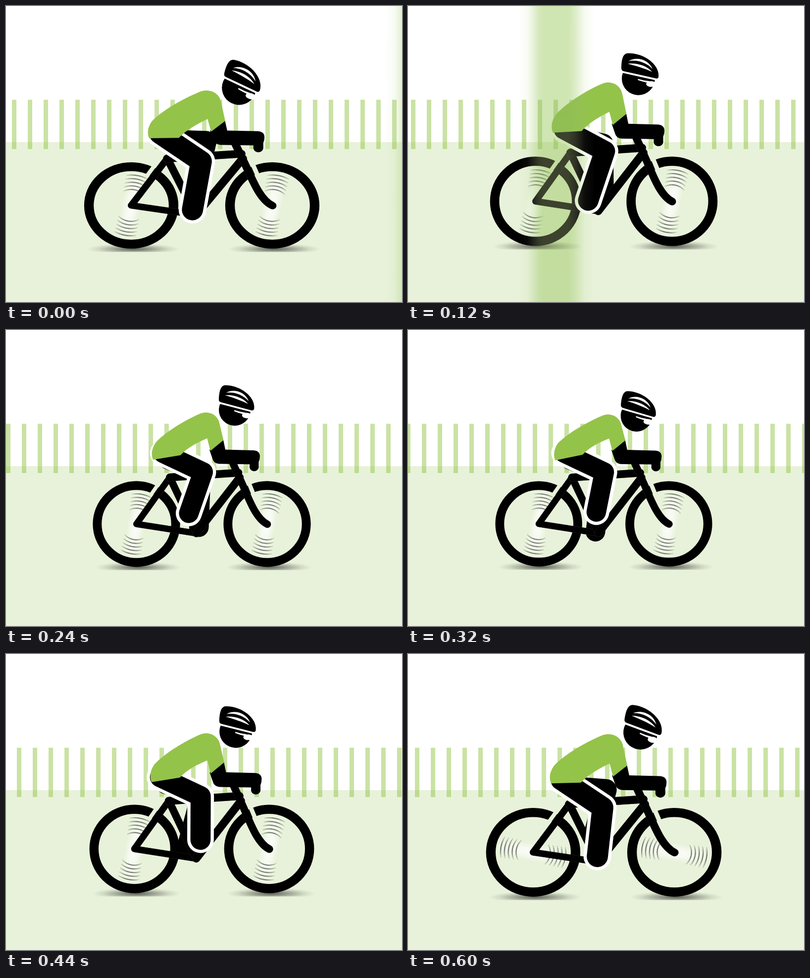
Write an HTML page with a canvas that moves like this. It is 800 by 600 pixels and loops after 640 ms.

```html
<!DOCTYPE html>
<html lang="en">
<head>
<meta charset="utf-8">
<title>Cyclist</title>
<style>
html, body { margin: 0; width: 100%; height: 100%; overflow: hidden; background: #fff; }
canvas { display: block; width: 800px; height: 600px; }
</style>
</head>
<body>
<canvas id="stage" width="800" height="600"></canvas>
<script>
const ctx = document.getElementById('stage').getContext('2d');
const LOOP = 640, STEP = 40, MID = 395.5, FLOOR = 489;
const GREEN = '#94c34a', GROUND = '#e8f2da';
const HUBS = [[255.5, 397], [535.5, 397]];

const rad = degrees => degrees * Math.PI / 180;
// Smooth waves over one turn of the pedals, in degrees
const wave = (angle, peak) => Math.cos(rad(angle - peak));
const hump = (angle, peak, sharpness) => Math.abs(Math.cos(rad(angle - peak) / 2)) ** sharpness;

const foot = angle => [378.5 - 15 * Math.sin(rad(angle + 7)), 369 + 44 * hump(angle, 0, 3)];

function pose(t) {
  const a = t / LOOP * 360;
  const land = hump(a, 0, 24), sag = hump(a, 185, 5);
  const sx = .978 + .041 * wave(a, -14);
  const hip = [313 + 4 * wave(a, 130), 249.5 + 8.5 * land];
  const farFoot = foot(a + 180);
  return {
    sx,
    sy: sx * (1.002 - .067 * land),
    base: FLOOR + (sx - 1) * 155,
    shoulder: 9 * sag,
    back: -1 - 3 * wave(a, 0),
    hem: 2 + 2.8 * wave(a, 20),
    head: [MID + 74.5 * sx + 5 * land, 134 + 24 * hump(a, 5, 13) + 32 * sag],
    tilt: rad(13 * land + 4 * sag),
    near: [hip, [395.5 + 3 * wave(a, 110), 288 + 27 * hump(a, 0, 8)], foot(a)],
    far: [
      [hip[0] + 12, hip[1] + 14],
      [394 + 10 * land, 282.5 - 8 * wave(a, 0)],
      [farFoot[0] + 2, farFoot[1] - 4]
    ]
  };
}

function fill(path, color) {
  ctx.fillStyle = color;
  ctx.fill(new Path2D(path));
}

function stroke(path, color, width) {
  ctx.strokeStyle = color;
  ctx.lineWidth = width;
  ctx.stroke(new Path2D(path));
}

function scenery(t) {
  ctx.fillStyle = '#fff';
  ctx.fillRect(0, 0, 800, 600);
  ctx.fillStyle = GROUND;
  ctx.fillRect(0, 276, 800, 324);
  ctx.fillStyle = 'rgba(149,197,75,.5)';
  for (let x = 12 - t / 20 - 32; x < 800; x += 32) ctx.fillRect(x, 190, 9, 100);
}

function glow(x, y, rx, ry, stops) {
  ctx.save();
  ctx.translate(x, y);
  ctx.scale(rx, ry);
  const g = ctx.createRadialGradient(0, 0, 0, 0, 0, 1);
  stops.forEach(([at, color]) => g.addColorStop(at, color));
  ctx.fillStyle = g;
  ctx.fillRect(-1, -1, 2, 2);
  ctx.restore();
}

function shadow(x) {
  ctx.save();
  ctx.beginPath();
  ctx.rect(x - 100, FLOOR - 20, 200, 27);
  ctx.clip();
  glow(x + 4, FLOOR + 1, 92, 12, [
    [0, 'rgba(0,0,0,.6)'], [.4, 'rgba(0,0,0,.33)'], [.75, 'rgba(0,0,0,.1)'], [1, 'rgba(0,0,0,0)']
  ]);
  ctx.restore();
}

function spokes(x, y, angle) {
  ctx.save();
  ctx.translate(x, y);
  ctx.rotate(angle);
  glow(0, 0, 76, 19, [
    [0, 'rgba(255,255,255,.9)'], [.5, 'rgba(255,255,255,.55)'], [1, 'rgba(255,255,255,0)']
  ]);
  ctx.lineCap = 'butt';
  const arc = (r, side, span, color) => {
    ctx.beginPath();
    ctx.arc(0, 0, r, side - span, side + span);
    ctx.lineWidth = 2.2;
    ctx.strokeStyle = color;
    ctx.stroke();
  };
  for (const side of [0, Math.PI]) {
    for (let r = 34; r < 66; r += 7.7) {
      for (let half = 22; half > 5; half -= 5) {
        arc(r, side, half / r, 'rgba(40,45,35,.2)');
        arc(r + 3, side, half / r, 'rgba(255,255,255,.14)');
      }
    }
  }
  ctx.restore();
}

function wheels(t) {
  const angle = rad(t < 460 ? -79 : 10);
  for (const [x, y] of HUBS) {
    shadow(x);
    spokes(x, y, angle);
    ctx.beginPath();
    ctx.ellipse(x, y, 84, 82.5, 0, 0, 7);
    ctx.lineWidth = 19;
    ctx.strokeStyle = '#000';
    ctx.stroke();
  }
  // Slits beside the stay and the fork
  ctx.lineCap = 'butt';
  stroke('M284.5 337 L304 309', GROUND, 8);
  stroke('M494 303 L508 337', GROUND, 9);
}

function frame() {
  ctx.lineCap = ctx.lineJoin = 'round';
  const tubes = [
    ['M384 417 L255.5 397 L327 297', 13],
    ['M327 297 L384 417', 15],
    ['M327 297 L474 287', 16],
    ['M477 297 L384 417', 16],
    ['M462 266 L484 315 C497 345 512 386 536 397.5', 15]
  ];
  for (const [path, width] of tubes) {
    stroke(path, '#2b2b2b', width + .8);
    stroke(path, '#000', width);
  }
}

function leg(joints, width, color) {
  ctx.lineCap = ctx.lineJoin = 'round';
  stroke('M' + joints.join(' L'), color, width);
}

function arm() {
  fill('M412 238 L441 214 L446 237.5 L507 239 Q520 240 520 252 Q520 259 517.5 264 L517.5 276'
    + ' A10 10 0 0 1 498 276 L498 269 L432 268 Q421 267 418.5 257 Z', '#000');
}

function shirt({ shoulder: s, back: b, hem: h }) {
  fill(`M291 ${258 + b} Q284 ${240 + b} 297 ${221 + b}
    C320 ${194 + (b + s) / 2} 365 ${166 + s} 394 ${154 + s}
    C411 ${148 + s} 431 ${157 + s} 434 ${178 + s}
    L442 217 L414 240 L407 213
    C385 ${222 + h / 2} 365 ${232 + h} 350 ${248.5 + h} Z`, GREEN);
}

function head(p) {
  ctx.save();
  ctx.translate(...p.head);
  ctx.rotate(p.tilt);
  ctx.scale(p.sx, p.sx);
  ctx.translate(-470.5, -134);
  ctx.fillStyle = '#000';
  ctx.beginPath();
  ctx.arc(467, 143, 34, 0, 7);
  ctx.fill();
  ctx.lineCap = 'butt';
  stroke('M428 127.5 L513 146', '#fff', 5);
  fill('M432 122 C432 110 433 92 444 91 C475 89 510 112 508.5 138 Q508 143.5 503 142.5'
    + ' L437 128 Q432 127 432 122 Z', '#000');
  fill('M447 107 C462 97 488 103 496 123 C482 109 464 104 447 107 Z', '#fff');
  fill('M445 112.5 C465 110 485 117 495 129 C480 122 462 117 445 112.5 Z', '#fff');
  fill('M466 143.5 Q478 147 490 148 L488 152 Q474 149 466 146 Z', '#fff');
  ctx.fillStyle = '#fff';
  ctx.beginPath();
  ctx.ellipse(493, 154, 10, 6, 0, 0, 7);
  ctx.fill();
  ctx.restore();
}

// Blurred post rushing past in front of everything
function passingPost(t) {
  const x = 844 - 4.525 * t;
  const stops = [[0, 0], [.12, .14], [.27, .88], [.33, 1], [.65, 1], [.74, .74], [.87, .18], [1, 0]];
  ctx.save();
  for (const [mode, color] of [['screen', '74,74,64'], ['multiply', '207,229,178']]) {
    const g = ctx.createLinearGradient(x - 78, 0, x + 76, 0);
    stops.forEach(([at, alpha]) => g.addColorStop(at, `rgba(${color},${alpha})`));
    ctx.globalCompositeOperation = mode;
    ctx.fillStyle = g;
    ctx.fillRect(x - 78, 0, 154, 600);
  }
  ctx.restore();
}

function draw(t) {
  const p = pose(t);
  const width = 42 * p.sx;
  const inBike = paint => {
    ctx.save();
    ctx.transform(p.sx, 0, 0, p.sy, MID * (1 - p.sx), p.base - FLOOR * p.sy);
    paint();
    ctx.restore();
  };

  scenery(t);
  inBike(() => wheels(t));
  leg(p.far, width, '#000');
  inBike(() => { frame(); arm(); });
  leg(p.near, width + 13, '#fff');
  leg(p.near, width, '#000');
  inBike(() => shirt(p));
  head(p);
  passingPost(t);
}

const start = performance.now();
function tick() {
  const t = Math.max(0, performance.now() - start) % LOOP;
  draw(Math.floor(t / STEP) * STEP);
  requestAnimationFrame(tick);
}
tick();
</script>
</body>
</html>
```
